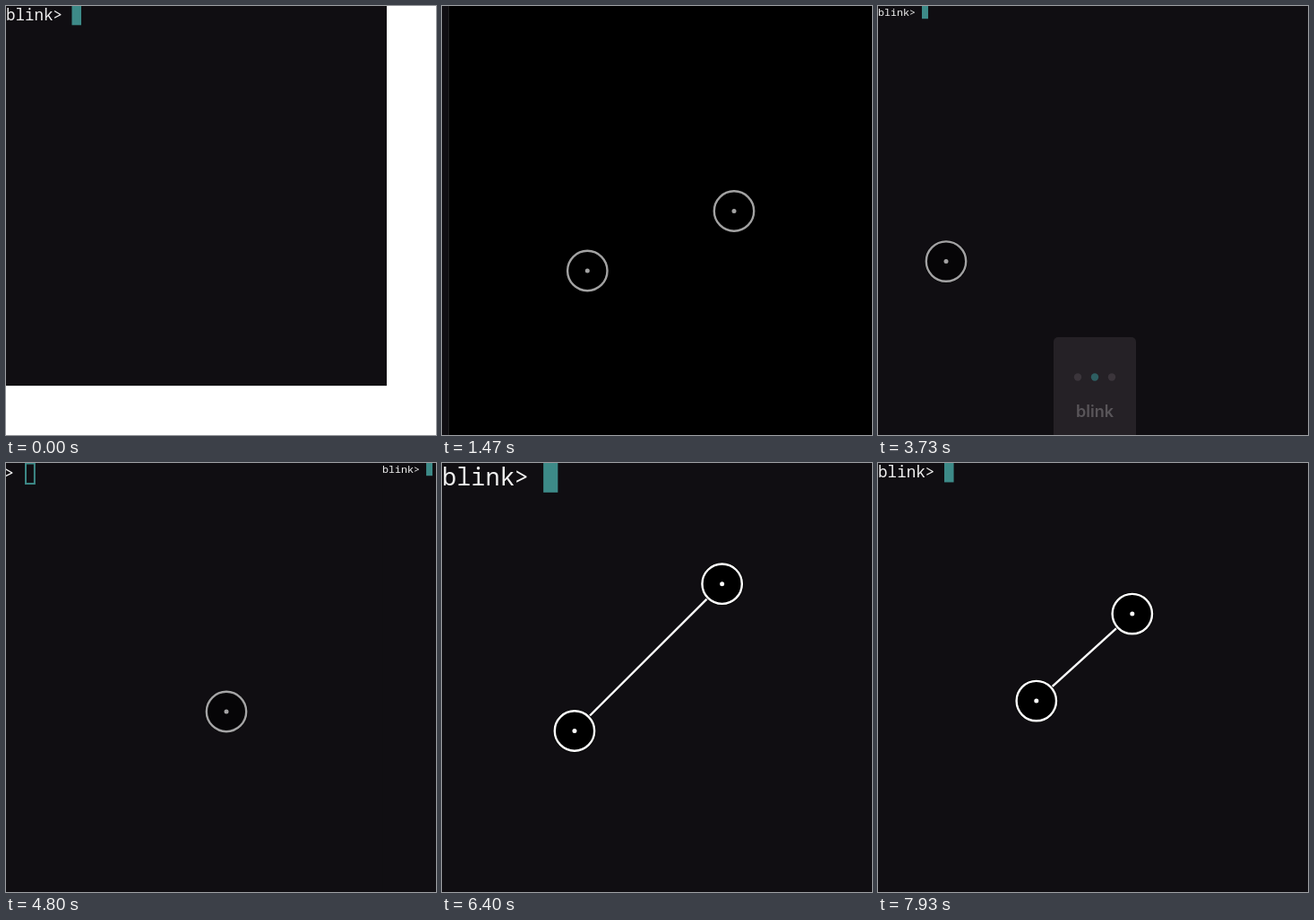
An HTML page with a canvas that plays this animation: 480 px wide and 478 px high, repeating every 8000 ms.

```html
<!DOCTYPE html>
<html lang="en">
<head>
<meta charset="utf-8">
<title>Terminal gestures</title>
<style>
  html, body { margin: 0; width: 100%; height: 100%; overflow: hidden; background: #fff; }
  canvas { display: block; }
</style>
</head>
<body>
<canvas id="stage" width="480" height="478"></canvas>
<script>
const ctx = document.getElementById('stage').getContext('2d');
const W = 480, H = 478, PAGE = 482, LOOP = 8000;
const BG = '#100e12', TEAL = '#3d8a88';
const BIG = 11.86, SMALL = 7;

const clamp = p => Math.max(0, Math.min(1, p));
const span = (t, a, b) => clamp((t - a) / (b - a));
const mix = (a, b, p) => a + (b - a) * p;
const smooth = p => (1 - Math.cos(Math.PI * p)) / 2;
const settle = p => 1 - (1 - p) ** 3;
const pulse = (t, a, b, c, d) => span(t, a, b) * (1 - span(t, c, d));

// One shell page; every measure follows from the character advance.
function shell(x, advance, focused, ready = 1) {
  ctx.fillStyle = '#000';
  ctx.fillRect(x, 0, PAGE, H);
  ctx.globalAlpha = ready;
  ctx.fillStyle = BG;
  ctx.fillRect(x, 0, PAGE, H);
  ctx.fillStyle = '#f0f0f0';
  ctx.font = `${advance / 0.6}px "Noto Sans Mono", monospace`;
  ctx.textAlign = 'left';
  ctx.fillText('blink>', x, advance * 1.55);
  const cx = x + advance * 7, h = advance * 2.03;
  if (focused) {
    ctx.fillStyle = TEAL;
    ctx.fillRect(cx, 0, advance, h);
  } else {
    ctx.strokeStyle = TEAL;
    ctx.lineWidth = advance / 6;
    ctx.strokeRect(cx + 1, 0.5, advance - 2, h - 1.5);
  }
  ctx.globalAlpha = 1;
}

function disc(x, y, r, color) {
  ctx.fillStyle = color;
  ctx.beginPath();
  ctx.arc(x, y, r, 0, Math.PI * 2);
  ctx.fill();
}

function finger(x, y, alpha) {
  if (!alpha) return;
  ctx.globalAlpha = alpha;
  disc(x, y, 24.2, '#000');
  ctx.strokeStyle = '#fff';
  ctx.lineWidth = 2.4;
  ctx.beginPath();
  ctx.arc(x, y, 22.2, 0, Math.PI * 2);
  ctx.stroke();
  disc(x, y, 2.5, '#fff');
  ctx.globalAlpha = 1;
}

function hud(active, alpha) {
  if (!alpha) return;
  ctx.globalAlpha = alpha;
  ctx.fillStyle = '#453f45';
  ctx.beginPath();
  ctx.roundRect(196, 369, 92, 120, 5);
  ctx.fill();
  for (let i = 0; i < 3; i++) {
    disc(223 + 19 * i, 413.5, 4.2, i === active ? '#3dbcbc' : '#5c565c');
  }
  ctx.fillStyle = '#a8a5a8';
  ctx.font = '600 18px Inter, sans-serif';
  ctx.textAlign = 'center';
  ctx.fillText('blink', 242, 458);
  ctx.globalAlpha = 1;
}

// Half the horizontal distance between the pinching fingers.
function pinchReach(t) {
  if (t < 6600) return mix(60.1, 86, smooth(span(t, 6000, 6530)));
  if (t < 7400) return mix(86, 44, smooth(span(t, 6670, 7330)));
  return mix(44, 53.5, smooth(span(t, 7470, 7930)));
}

function pinch(t) {
  const alpha = span(t, 5680, 5830);
  if (!alpha) return;
  const rx = pinchReach(t), ry = 48.5 + 1.158 * (rx - 53.5);
  const cx = 230.3, cy = 216.6;
  ctx.globalAlpha = alpha;
  ctx.strokeStyle = '#fff';
  ctx.lineWidth = 2.4;
  ctx.beginPath();
  ctx.moveTo(cx - rx, cy + ry);
  ctx.lineTo(cx + rx, cy - ry);
  ctx.stroke();
  finger(cx + rx, cy - ry, alpha);
  finger(cx - rx, cy + ry, alpha);
}

// The page follows the finger, then glides on after release.
const glide = (t, drag, release) =>
  mix(drag, PAGE, t < release ? 0 : settle(span(t, release, release + 480)));

function pages(t) {
  if (t < 2400) {
    const x = PAGE * (1 - settle(span(t, 1200, 1560)));
    shell(x - PAGE, BIG, t < 900);
    shell(x, SMALL, true, span(t, 1900, 2000));
  } else if (t < 3900) {
    const x = glide(t, 161 * smooth(span(t, 2470, 2800)), 2800);
    shell(x - PAGE, SMALL, t > 3250);
    shell(x, SMALL, true);
  } else {
    const x = glide(t, 170 * smooth(span(t, 4000, 4600)), 4600);
    const advance = 10.57 + 0.194 * (pinchReach(t) - 53.5);
    shell(x - PAGE, advance, t > 5050);
    shell(x, SMALL, true);
  }
}

function touches(t) {
  const tap = pulse(t, 1050, 1200, 1415, 1565);
  finger(326, 228.5, tap);
  finger(162.3, 295, tap);

  const nudge = 9 * span(t, 2250, 2330);
  const first = smooth(span(t, 2470, 2800));
  finger(mix(76 + nudge, 246, first), mix(284.6, 277, first),
    pulse(t, 2130, 2280, 2945, 3095));

  const second = smooth(span(t, 4000, 4600));
  finger(mix(76, 246, second), mix(284.6, 277, second),
    pulse(t, 3636, 3786, 4745, 4895));
  pinch(t);
}

function draw(now) {
  const t = now % LOOP;
  ctx.setTransform(1, 0, 0, 1, 0, 0);
  ctx.fillStyle = '#fff';
  ctx.fillRect(0, 0, W, H);
  const zoom = mix(0.8854, 1, smooth(span(t, 50, 530)));
  ctx.save();
  ctx.scale(zoom, zoom);
  ctx.beginPath();
  ctx.rect(0, 0, W, H);
  ctx.clip();
  pages(t);
  hud(2, pulse(t, 1600, 1750, 2010, 2210));
  hud(1, pulse(t, 3130, 3280, 3610, 3810));
  hud(0, pulse(t, 4930, 5080, 5410, 5610));
  touches(t);
  ctx.restore();
}

let start;
function tick(now) {
  start ??= now;
  draw(now - start);
  requestAnimationFrame(tick);
}
requestAnimationFrame(tick);
</script>
</body>
</html>
```
